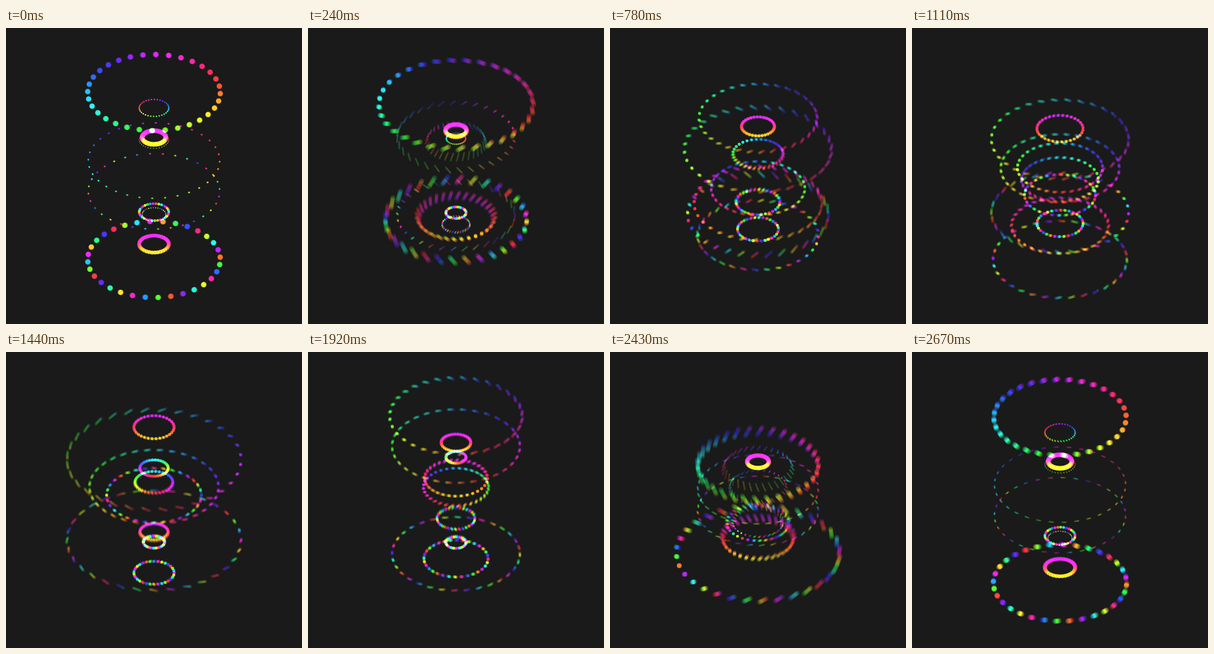
These frames come from a looping animation (500 px wide and 500 px high, 2.7 s). An HTML page with a canvas:

```html
<!DOCTYPE html>
<html lang="en">
<head>
<meta charset="utf-8">
<title>Spinning rings</title>
<style>
html, body { margin: 0; width: 100%; height: 100%; overflow: hidden; background: #1a1a1a; }
canvas { display: block; width: 500px; height: 500px; }
</style>
</head>
<body>
<canvas id="stage" width="500" height="500"></canvas>
<script>
const LOOP = 2700, STEP = 30, DOTS = 32, SAMPLES = 12, TILT = 0.574;
const TAU = Math.PI * 2, DEG = 360 / TAU;
const SPIN = TAU * 40 / DOTS;

// Two rings of one radius, mirrored above and below the middle.
const pair = (r, y) => [[r, -y], [r, y]];

// Key poses: radius and height of the ten rings.
const poses = [
  { at: 0, rings: [...pair(112, 141), ...pair(111, 26), ...pair(25, 115), ...pair(20, 65), ...pair(25, 61)] },
  { at: 480, rings: [[147, -87], [127, 8], ...pair(88, 111), [78, 8], [110, 22], [18, -90], [29, 100], ...pair(13, 60)] },
  { at: 1110, rings: [[100, -13], [113, 141], ...pair(116, 62), [65, 6], [82, 84], ...pair(39, 80), [72, -14], [60, 32]] },
  { at: 1440, rings: [...pair(147, 68), [109, -22], [80, -8], ...pair(24, 54), ...pair(34, 123), [32, -30], [18, 71]] },
  { at: 1920, rings: [[112, -142], [54, 99], ...pair(108, 91), [55, -22], [53, -37], [25, -97], [32, 31], ...pair(17, 72)] },
  { at: 2220, rings: [[95, -1], [147, 50], ...pair(95, 22), [85, 0], [88, 8], [18, -69], [60, 14], [62, 2], [70, 25]] }
];

// Dot size at rest, and how often the rainbow runs round each ring (0: magenta to yellow only).
const sizes = [9, 9, 2.8, 2.8, 2.4, 6.5, 8, 2, 1.5, 4.5];
const turns = [1, 9, 1, 7, -1, 0, 0, 9, 1, 7];

const ctx = document.getElementById('stage').getContext('2d');

// Pose k counted round the loop, with its time unwrapped.
function poseAt(k) {
  const n = poses.length, lap = Math.floor(k / n), p = poses[k - lap * n];
  return { at: p.at + lap * LOOP, rings: p.rings };
}

// Smooth curve through the poses that comes to rest at the seam of the loop.
function value(k, i, axis, t) {
  const [p, a, b, q] = [k - 1, k, k + 1, k + 2].map(poseAt);
  const at = pose => pose.rings[i][axis];
  const span = b.at - a.at, u = (t - a.at) / span, w = 1 - u;
  const va = k === 0 ? 0 : (at(b) - at(p)) / (b.at - p.at) * span;
  const vb = k === poses.length - 1 ? 0 : (at(q) - at(a)) / (q.at - a.at) * span;
  return at(a) * (1 + 2 * u) * w * w + va * u * w * w + at(b) * u * u * (3 - 2 * u) - vb * u * u * w;
}

function hueAt(i, a, spin, t) {
  if (turns[i] === 0) return 290 + 60 * (1 - Math.cos(a));
  const drift = -110 * Math.sin(Math.PI * t / LOOP);
  const fixed = Math.abs(turns[i]) === 1;
  return 290 + drift + turns[i] * (fixed ? a : a - spin) * DEG;
}

function drawRing(i, time, shift) {
  const t = (time + LOOP) % LOOP;
  let k = poses.length - 1;
  while (t < poses[k].at) k--;
  const r = Math.min(148, Math.max(12, value(k, i, 0, t)));
  const y = 250 + value(k, i, 1, t);
  const size = 5 + (sizes[i] - 5) * Math.cos(Math.PI * t / LOOP) ** 6;
  const spin = SPIN * time / LOOP + (i % 2 ? -0.062 : 0.027);
  for (let d = 0; d < DOTS; d++) {
    const a = spin + TAU * d / DOTS;
    ctx.fillStyle = `hsl(${(hueAt(i, a, spin, t) + shift).toFixed(1)}, 100%, 52%)`;
    ctx.beginPath();
    ctx.arc(250 + r * Math.sin(a), y - TILT * r * Math.cos(a), size / 2, 0, TAU);
    ctx.fill();
  }
}

function draw(now) {
  const t = Math.floor(now % LOOP / STEP) * STEP;
  const rest = Math.min(t, LOOP - t);
  const shutter = STEP * Math.min(1, 0.25 + rest / 60);
  ctx.globalCompositeOperation = 'source-over';
  ctx.globalAlpha = 1;
  ctx.fillStyle = '#1a1a1a';
  ctx.fillRect(0, 0, 500, 500);
  ctx.globalCompositeOperation = 'lighter';
  ctx.globalAlpha = 1 / SAMPLES;
  for (let s = 0; s < SAMPLES; s++) {
    const u = s / (SAMPLES - 1) - 0.5;
    for (let i = 0; i < sizes.length; i++) drawRing(i, t + u * shutter, u * 50);
  }
}

function tick() {
  draw(performance.now());
  requestAnimationFrame(tick);
}
tick();
</script>
</body>
</html>
```
